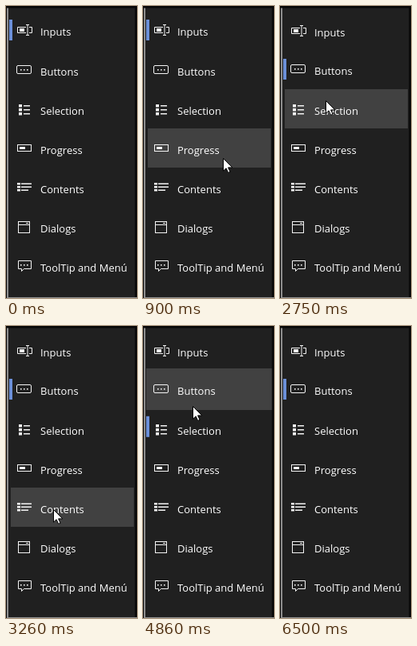
Animation, 164 px wide and 365 px high, one loop 6570 ms. Source, as an HTML page:

```html
<!DOCTYPE html>
<html lang="en">
<head>
<meta charset="utf-8">
<title>Navigation menu</title>
<style>
  html, body { margin: 0; width: 100%; height: 100%; overflow: hidden; background: #202020; }
  svg { display: block; width: 164px; height: 365px; }
  text { font: 13px "Open Sans", "Noto Sans", sans-serif; fill: #fff; }
  .icon { fill: none; stroke: #f4f4f4; stroke-width: 1; }
  .icon .solid { fill: #f4f4f4; stroke: none; }
</style>
</head>
<body>
<svg viewBox="0 0 164 365" xmlns="http://www.w3.org/2000/svg">
  <rect width="164" height="365" fill="#202020"/>
  <rect id="hover" fill="#414141"/>
  <rect x="1" width="2" height="365" fill="#8f8f8f"/>
  <rect y="364" width="164" height="1" fill="#8f8f8f"/>
  <rect width="1" height="365" fill="#070707"/>
  <rect width="164" height="2.5" fill="#070707"/>
  <rect x="161.5" width="2.5" height="364" fill="#070707"/>
  <rect id="page" x="162" y="67" width="1" height="291" fill="#6a93bd"/>
  <rect id="mark" x="4" width="4" height="26" fill="#6b8fd8"/>
  <g id="rows"></g>
  <path id="cursor" d="M.5 .5V16.2L4.1 12.8L6.7 18.4L9.1 17.3L6.6 11.9H11.8Z" fill="#fff" stroke="#000"/>
</svg>
<script>
const LOOP = 6570, STEP = 70, PITCH = 49, SLIDE = 308;
const $ = id => document.getElementById(id);

const box = (x, y, w, h, r = 0) => `<rect x="${x}" y="${y}" width="${w}" height="${h}" rx="${r}"/>`;
const solid = (x, y, w, h) => `<rect class="solid" x="${x}" y="${y}" width="${w}" height="${h}"/>`;
const line = d => `<path d="${d}"/>`;
const repeat = (n, draw) => Array.from({ length: n }, (_, i) => draw(i)).join("");
const dots = y => repeat(3, i => solid(18 + 4 * i, y, 1.6, 1.6));

// Icons are drawn in the coordinates of the first row.
const items = [
  ["Inputs", line("M25 27.5H14.5V34.5H25M29 27.5H32.5V34.5H29M25 24.5H29M27 24.5V37.5M25 37.5H29") + solid(17, 29, 6, 4)],
  ["Buttons", box(13.5, 25.5, 18, 10, 1.5) + dots(30)],
  ["Selection", repeat(3, i => solid(16, 25 + 5 * i, 4, 3.5) + solid(22, 26 + 5 * i, 8, 1.5))],
  ["Progress", box(14.5, 26.5, 17, 8) + solid(17, 29, 7, 3)],
  ["Contents", repeat(3, i => solid(14, 25 + 4 * i, 4, 2.5) + solid(19, 25.5 + 4 * i, i < 2 ? 13 : 9, 1.5))],
  ["Dialogs", box(15.5, 24.5, 14, 14) + line("M15 28.5H30") + solid(25, 26, 3, 1)],
  ["ToolTip and Menú", line("M15.5 24.5H31.5V34.5H22.5L19.5 37.5V34.5H15.5Z") + dots(29)]
];

$("rows").innerHTML = items.map(([label, icon]) =>
  `<g><g class="icon">${icon}</g><text x="43" y="38">${label}</text></g>`).join("");
const rows = [...$("rows").children];

// Pointer glides: each eases on from where the last one ended.
const enter = 200, leave = 5970;
const glides = [
  { at: enter, ms: 630, to: [100, 190] },
  { at: 900, ms: 360, to: [50, 117] },
  { at: 1790, ms: 210, to: [56, 89] },
  { at: 2680, ms: 860, to: [59.5, 240] },
  { at: 4440, ms: 210, to: [62, 100] },
  { at: 5270, ms: 630, to: [131, 363] }
];
const clicks = [
  { at: 0, row: 0 },
  { at: 2200, row: 1 },
  { at: 3880, row: 4 },
  { at: 4650, row: 1 }
];
const starts = [...glides, ...clicks].map(e => e.at);

const clamp = k => Math.max(0, Math.min(1, k));
const lerp = (a, b, k) => a + (b - a) * k;
const easeOut = k => 1 - (1 - k) ** 2.5;

function pointer(t) {
  return glides.reduce(([x, y], { at, ms, to }) => {
    const k = easeOut(clamp((t - at) / ms));
    return [lerp(x, to[0], k), lerp(y, to[1], k)];
  }, [144, 301]);
}

function setAttrs(el, attrs) {
  Object.entries(attrs).forEach(([k, v]) => el.setAttribute(k, v));
}

function show(el, on) {
  el.setAttribute("visibility", on ? "visible" : "hidden");
}

function render(time) {
  // The picture holds for one step, counted from the latest action.
  const start = Math.max(...starts.filter(s => s <= time));
  const t = start + Math.floor((time - start) / STEP) * STEP;

  const past = clicks.filter(c => c.at <= t).reverse();
  const [{ at, row: selected }, { row: from } = clicks[0]] = past;
  const slide = clamp((t - at) / SLIDE);
  $("mark").setAttribute("y", 17 + PITCH * lerp(from, selected, slide));

  rows.forEach((row, i) =>
    row.setAttribute("transform", `translate(0 ${PITCH * i - (i === selected ? 1 : 0)})`));

  const inside = t >= enter && t < leave;
  const [x, y] = pointer(t);
  show($("cursor"), inside);
  $("cursor").setAttribute("transform", `translate(${Math.round(x)} ${Math.round(y)})`);

  // The selected row has a slightly larger highlight.
  const over = Math.floor((y - 6) / PITCH);
  const grow = over === selected ? 2 : 0;
  show($("hover"), inside && over < items.length);
  setAttrs($("hover"), {
    x: 6 - grow, y: 6 + PITCH * over - grow,
    width: 154 + 2 * grow, height: PITCH + 1.5 * grow
  });

  show($("page"), selected === 4);
}

function tick(now) {
  render(Math.max(0, now) % LOOP);
  requestAnimationFrame(tick);
}
render(0);
requestAnimationFrame(tick);
</script>
</body>
</html>
```
